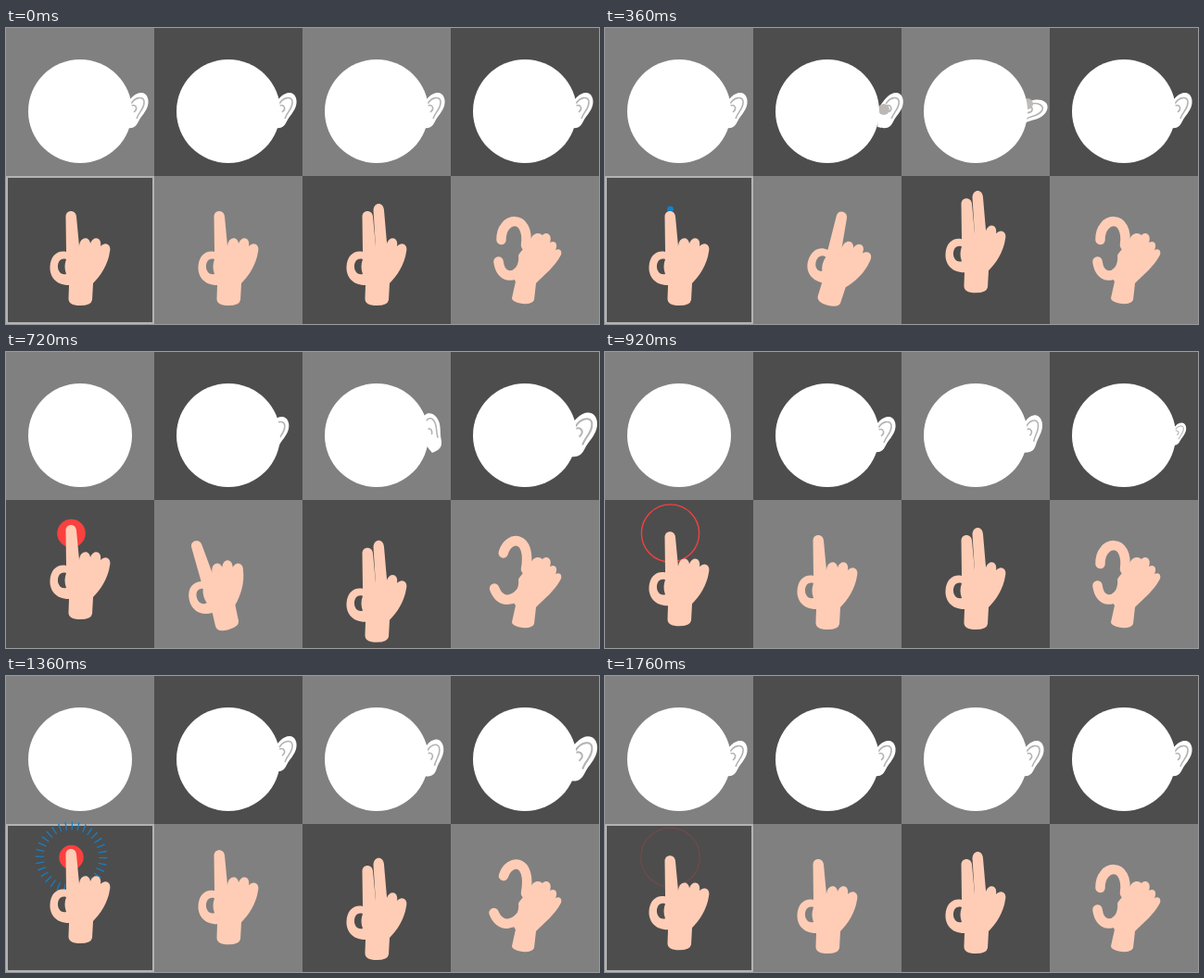
Write an HTML page with a canvas that moves like this. It is 640 px wide and 320 px high and loops after 1.8 s.

```html
<!DOCTYPE html>
<html>
<head>
<meta charset="utf-8">
<title>Touch gestures</title>
<style>
  html, body { margin: 0; width: 100%; height: 100%; overflow: hidden; background: #4d4d4d; }
  canvas { display: block; }
</style>
</head>
<body>
<canvas id="stage" width="640" height="320"></canvas>
<script>
const ctx = document.getElementById('stage').getContext('2d');
const LOOP = 1800, LIGHT = '#808080', DARK = '#4d4d4d', SKIN = '#ffcdb6', BLUE = '#1481c8', RED = '#f9413f';

const fist = new Path2D(`M64.5 204C64.5 196 75.5 196 76 204L79 236C80 225 90 225 91 233
  C94 224 104 226 102 236C108 230 114 235 112 242C110 256 102 268 94 276L93 294Q92 300 80 300
  Q67 300 67.5 292L68 278C53 278 47 268 47.5 258C48 246 56 240 65 242Z
  M65 250C53 246 53 269 65 266Q62 258 65 250Z`);
const middleFinger = new Path2D('M76.5 197C77 187.5 87.5 187.5 88 197L91.5 238L79 238Z');
const pinchPalm = new Path2D(`M74 244L86 229C88 222 95 220 99 224C104 219 110 224 107 232
  C113 229 116 234 113 240C119 237 121 243 118 247C112 258 102 266 92 276L90 294Q88 299 77 298
  Q66 296 66 292L70 274C64 268 75 256 73 246Z`);
const ear = new Path2D('M126 88C134 76 139 70 146 70C152 70 155 77 153 84C151 91 146 95 143 101C140 107 137 110 126 107Z');
const earLines = new Path2D('M135 82C139 75 148 73 149 79C150 87 143 91 141 98M135 84C140 82 143 87 138 91');

// Smooth rise from 0 to 1 between two times
function ramp(t, from, to) {
  const u = Math.min(1, Math.max(0, (t - from) / (to - from)));
  return u * u * (3 - 2 * u);
}

// One sine cycle between two times, 0 outside
function cycle(t, from, to) {
  return t > from && t < to ? Math.sin(2 * Math.PI * (t - from) / (to - from)) : 0;
}

function at(x, y, draw) {
  ctx.save();
  ctx.translate(x, y);
  draw();
  ctx.restore();
}

function turn(x, y, degrees, scale = 1) {
  ctx.translate(x, y);
  ctx.rotate(degrees * Math.PI / 180);
  ctx.scale(scale, scale);
  ctx.translate(-x, -y);
}

function disc(x, y, r, color) {
  ctx.fillStyle = color;
  ctx.beginPath();
  ctx.arc(x, y, r, 0, 7);
  ctx.fill();
}

function drawEar({ dx = 0, dy = 0, angle = 0, scale = 1 }) {
  at(dx, dy, () => {
    turn(136, 88, angle, scale);
    ctx.fillStyle = '#fff';
    ctx.fill(ear);
    ctx.strokeStyle = '#b3b3b3';
    ctx.lineWidth = 1.6;
    ctx.stroke(earLines);
  });
  // Shaded root, seen when the ear is pulled away from the head
  ctx.globalAlpha = Math.min(1, Math.max(0, dx / 8, angle / 40));
  disc(136 + dx * .6, angle ? 82 : 88, 6, '#bcb8b6');
  ctx.globalAlpha = 1;
}

function head(column, pose) {
  at(column * 160, 0, () => {
    if (pose) drawEar(pose);
    disc(80, 90, 56, '#fff');
  });
}

// Ring between two radii, optionally cut into rays
function ring(inner, outer, color, alpha, rays) {
  if (alpha <= 0 || outer <= inner) return;
  const mid = (inner + outer) / 2;
  ctx.save();
  ctx.globalAlpha = alpha;
  ctx.strokeStyle = color;
  ctx.lineWidth = outer - inner;
  if (rays) ctx.setLineDash([1.2, mid * 2 * Math.PI / rays - 1.2]);
  ctx.beginPath();
  ctx.arc(70.5, 196, mid, 0, 2 * Math.PI);
  ctx.stroke();
  ctx.restore();
}

function blueBurst(t) {
  const inner = 39 * ramp(t, 130, 330);
  ring(inner, 39 * ramp(t, 0, 280), BLUE, 1, inner && 32);
}

function redBurst(t) {
  if (t < 0) return;
  const outer = 2 + 30.5 * ramp(t, 0, 440);
  ring((outer - 1.4) * ramp(t, 200, 400), outer, RED, 1 - ramp(t, 380, 660));
}

function drawFist() {
  ctx.fillStyle = SKIN;
  ctx.fill(fist, 'evenodd');
}

function tapHand(t) {
  blueBurst(t - 310);
  blueBurst(t - 1095);
  redBurst(t - 520);
  redBurst(t - 1180);
  const lift = t => ramp(t, 0, 140) - ramp(t, 500, 600);
  at(0, -11 * (lift(t - 360) + lift(t - 1200)), drawFist);
}

function pinchHand(open) {
  const mix = (a, b) => a + (b - a) * open;
  ctx.strokeStyle = ctx.fillStyle = SKIN;
  ctx.lineWidth = 10.5;
  ctx.lineCap = 'round';
  ctx.beginPath();
  ctx.moveTo(mix(54.5, 57), mix(229, 216));
  ctx.bezierCurveTo(mix(54, 63), mix(203, 197), mix(86, 88), mix(200, 197), 81, 235);
  ctx.moveTo(mix(51.5, 46.5), mix(252.5, 256));
  ctx.bezierCurveTo(54, mix(272, 274), 70, mix(272, 269), 78, 256);
  ctx.stroke();
  ctx.fill(pinchPalm);
}

function render(t) {
  for (let i = 0; i < 8; i++) {
    const column = i % 4, row = i >> 2;
    ctx.fillStyle = (column + row) % 2 ? DARK : LIGHT;
    ctx.fillRect(column * 160, row * 160, 160, 160);
  }

  const swing = 15 * cycle(t, 160, 920);
  const slide = -23 * cycle(t, 1060, 1760);
  const scroll = t => -14 * (cycle(t, 200, 920) + cycle(t, 1000, 1620));
  const spread = ramp(t, 380, 540), squeeze = ramp(t, 680, 880);
  const respread = ramp(t, 960, 1160), relax = ramp(t, 1400, 1660);

  head(0, (t < 440 || t >= 1400) && {});
  head(1, { dx: swing * .55, dy: slide * .5 });
  head(2, { angle: -3 * scroll(t - 30) });
  head(3, { scale: 1 + .33 * spread - .69 * squeeze + .62 * respread - .26 * relax });

  if (t < 440 || t >= 1240) {
    ctx.strokeStyle = '#b3b3b3';
    ctx.lineWidth = 2;
    ctx.strokeRect(1, 161, 158, 158);
  }
  tapHand(t);
  at(160, slide, () => {
    turn(81, 300, swing);
    drawFist();
  });
  at(320, scroll(t), () => {
    drawFist();
    ctx.fill(middleFinger);
  });
  at(480, 0, () => pinchHand(spread - squeeze + respread - relax));
}

const start = performance.now();
function tick() {
  render((performance.now() - start) % LOOP);
  requestAnimationFrame(tick);
}
tick();
</script>
</body>
</html>
```
